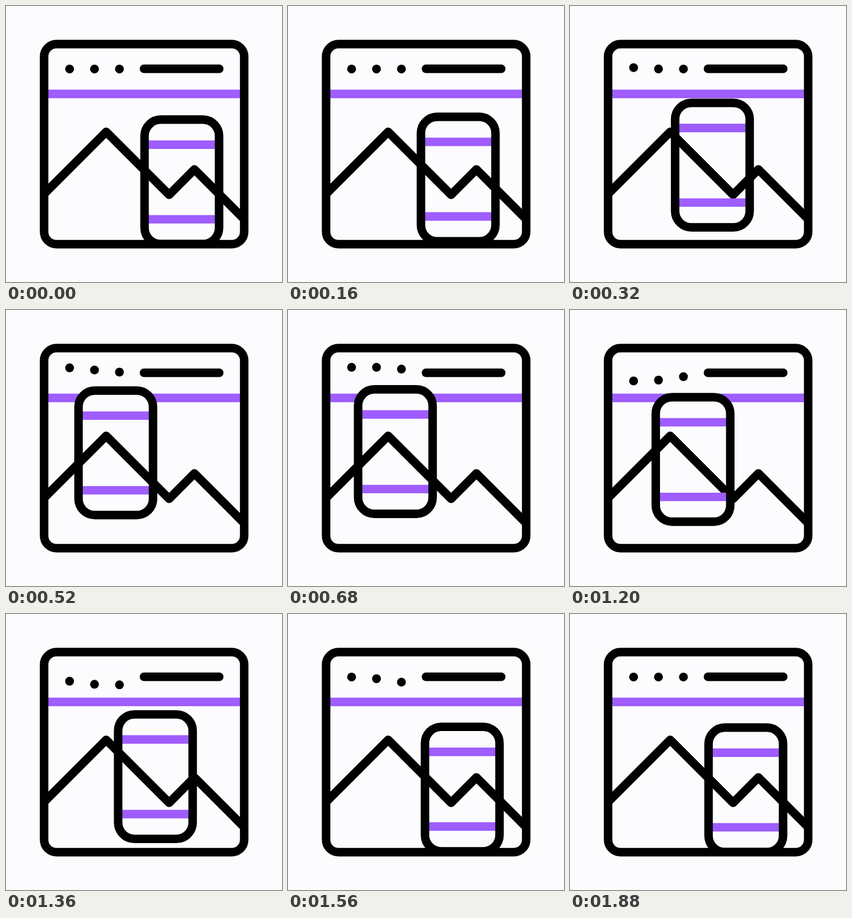
Animation of 500 by 500 pixels, one loop 1.92 s. Source, as an HTML page:

```html
<!DOCTYPE html>
<html lang="en">
<head>
<meta charset="utf-8">
<title>Responsive layout icon</title>
<style>
  html, body { margin: 0; width: 100%; height: 100%; overflow: hidden; background: #fcfcff; }
  svg { display: block; width: 100%; height: 100%; }
  .line { fill: none; stroke: #000; stroke-width: 15.4; stroke-linecap: round; stroke-linejoin: round; }
  .accent { fill: none; stroke: #9f5dff; stroke-width: 15.4; }
  .paper { fill: #fcfcff; }
</style>
</head>
<body>
<svg viewBox="0 0 500 500">
  <path class="accent" d="M69 159.2H431"/>
  <rect class="paper phone" x="251" y="205.8" width="135" height="225.5" rx="29.5"/>
  <path class="line" d="M70 339.5L181.5 228L295.5 342L341.3 296L430 384.7"/>
  <rect class="line" x="69" y="69" width="362.5" height="362.5" rx="22.5"/>
  <path class="line" d="M250 113.8H386.3"/>
  <circle class="dot" cx="115.2" cy="114.2" r="8"/>
  <circle class="dot" cx="160.3" cy="114.2" r="8"/>
  <circle class="dot" cx="205.5" cy="114.2" r="8"/>
  <g class="phone">
    <path class="accent" d="M251 251.2H386M251 386.4H386"/>
    <rect class="line" x="251" y="205.8" width="135" height="225.5" rx="29.5"/>
  </g>
</svg>
<script>
const LOOP = 1920;
const DOT_LAG = 115;
const phoneParts = document.querySelectorAll('.phone');
const dots = document.querySelectorAll('.dot');

// Keys are [time, value] pairs, eased in and out between neighbours.
const phoneKeys = [[0, 0], [72, 0], [578, 1], [1015, 1], [1615, 0], [LOOP, 0]];
const dotKeys = [[180, 0], [630, -11], [1172, 14.5], [1560, 0]];

function valueAt(keys, time) {
  if (time <= keys[0][0]) return keys[0][1];
  for (let i = 1; i < keys.length; i++) {
    const [t0, v0] = keys[i - 1];
    const [t1, v1] = keys[i];
    if (time < t1) {
      const s = (time - t0) / (t1 - t0);
      return v0 + (v1 - v0) * s * s * (3 - 2 * s);
    }
  }
  return keys[keys.length - 1][1];
}

function draw(time) {
  const shift = valueAt(phoneKeys, time);
  phoneParts.forEach(part =>
    part.setAttribute('transform', `translate(${-124 * shift} ${-62 * shift})`));
  dots.forEach((dot, i) =>
    dot.setAttribute('transform', `translate(0 ${valueAt(dotKeys, time - i * DOT_LAG)})`));
}

const start = performance.now();
function tick() {
  draw((performance.now() - start) % LOOP);
  requestAnimationFrame(tick);
}
draw(0);
requestAnimationFrame(tick);
</script>
</body>
</html>
```
